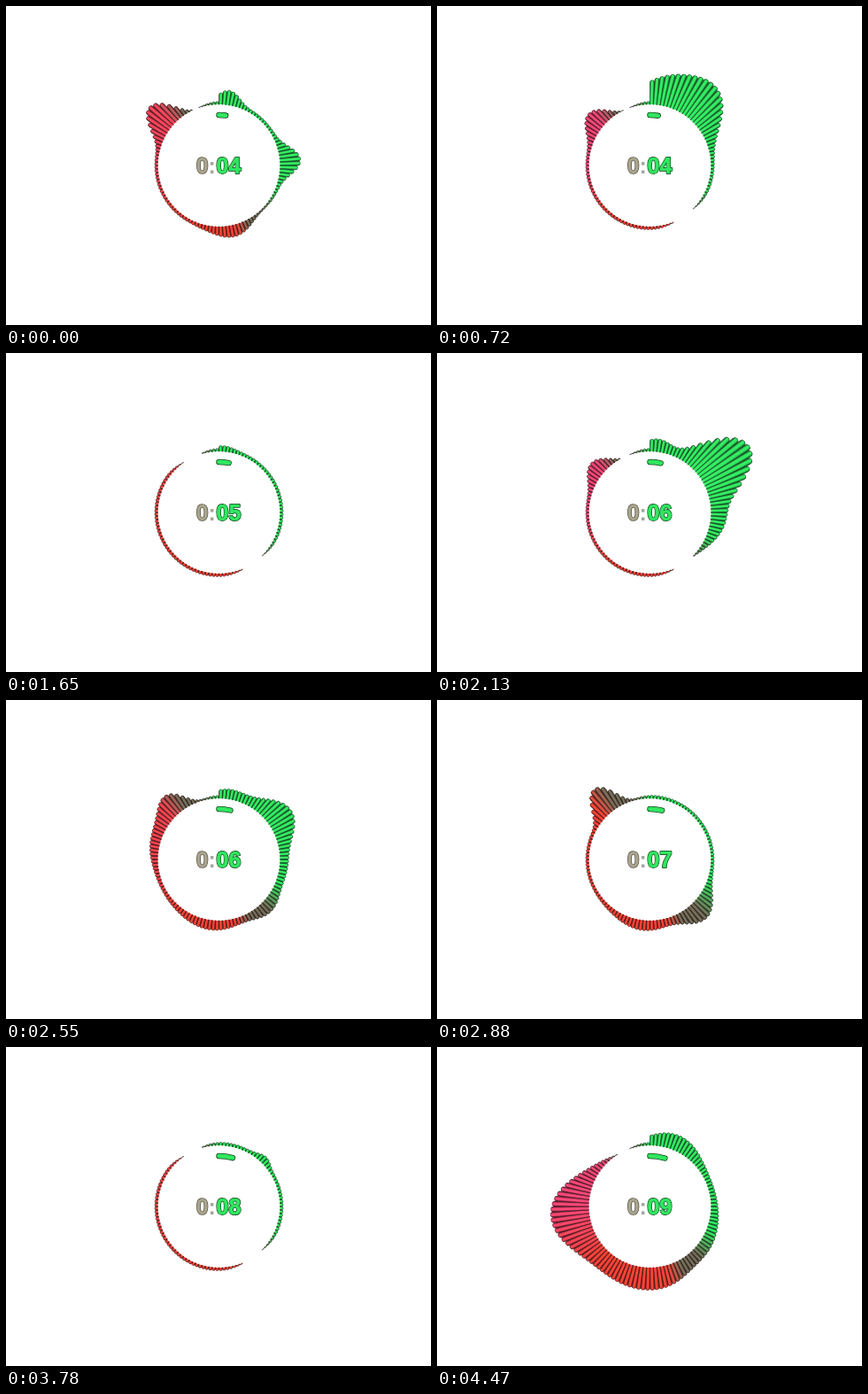
Recreate the animation shown at these times as an HTML page with a canvas. Size 480 by 360 pixels, loop 4500 ms.

```html
<!DOCTYPE html>
<html>
<head>
<meta charset="utf-8">
<style>
  html, body { margin: 0; width: 100%; height: 100%; overflow: hidden; background: #fff; }
  canvas { display: block; width: 480px; height: 360px; }
</style>
</head>
<body>
<canvas id="stage" width="480" height="360"></canvas>
<script>
const ctx = document.getElementById('stage').getContext('2d');
const LOOP = 4500, STEP = 30, BARS = 112;
const CX = 240.5, CY = 180, R = 69;
const RAD = Math.PI / 180, HALF = Math.PI / BARS;

const GREEN = [50, 230, 96], BROWN = [118, 108, 88], RED = [255, 66, 54], PINK = [242, 70, 116];

// Key shapes; each bump is [angle, height, width].
const poses = [
  { at: 0, pink: .6, bumps: [[8, 13, 8], [86, 20, 9], [165, 11, 16], [310, 31, 10]] },
  { at: 720, pink: 1, bumps: [[18, 31, 22], [44, 26, 14], [310, 19, 10]] },
  { at: 1650, pink: .2, bumps: [[4, 3, 8]] },
  { at: 2130, pink: 1, bumps: [[6, 11, 11], [56, 62, 14], [96, 13, 16], [310, 15, 10]] },
  { at: 2880, pink: 0, bumps: [[137, 23, 13], [185, 8, 20], [322, 32, 9]] },
  { at: 3780, pink: .2, bumps: [[44, 5, 6]] },
  { at: 4470, pink: 1, bumps: [[22, 14, 20], [180, 22, 50], [266, 35, 21]] }
];
const swell = [[22, 32, 18], [190, 22, 28], [290, 58, 18]];

const lerp = (a, b, k) => a + (b - a) * k;
const mix = (a, b, k) => a.map((v, i) => lerp(v, b[i], k));
const rgb = (c, k = 1) => `rgb(${c.map(v => Math.min(255, Math.round(v * k))).join(',')})`;
const bell = (a, mid, width) => Math.exp(-(((a - mid) / width) ** 2) / 2);
const sum = (bumps, a) => bumps.reduce((h, [mid, top, w]) => h + top * bell(a, mid, w), 0);

function colourAt(a, pink) {
  const warm = mix(RED, PINK, pink);
  const stops = [
    [0, GREEN], [112, GREEN], [136, BROWN], [152, BROWN], [166, RED], [225, RED],
    [268, warm], [313, warm], [327, BROWN], [345, BROWN], [360, GREEN]
  ];
  const i = stops.findIndex(s => s[0] > a);
  const [a0, c0] = stops[i - 1], [a1, c1] = stops[i];
  return mix(c0, c1, (a - a0) / (a1 - a0));
}

function stateAt(t) {
  const n = Math.max(1, poses.findIndex(p => p.at >= t) % poses.length);
  const from = poses[n - 1], to = poses[n], span = to.at - from.at;
  const raw = (t - from.at) / span;
  const k = raw * raw * (3 - 2 * raw);
  const beat = Math.sin(Math.PI * raw * Math.round(span / 450)) ** 2;
  return {
    pink: lerp(from.pink, to.pink, k),
    // The ring thins out where the two colour bands meet.
    height: a => 3.6 - 4.6 * (bell(a, 145, 13) + bell(a, 333, 11))
      + lerp(sum(from.bumps, a), sum(to.bumps, a), k) + beat * sum(swell, a)
  };
}

function drawBar(a, h, colour) {
  const outer = R + h, w = outer * HALF;
  const neck = outer - Math.min(h, w * 1.2);
  const shade = ctx.createLinearGradient(-w, 0, w, 0);
  shade.addColorStop(0, rgb(colour, .25));
  shade.addColorStop(.35, rgb(colour, 1.05));
  shade.addColorStop(.65, rgb(colour));
  shade.addColorStop(1, rgb(colour, .3));
  ctx.save();
  ctx.translate(CX, CY);
  ctx.rotate(a * RAD);
  ctx.beginPath();
  ctx.moveTo(-R * HALF, -R);
  ctx.lineTo(-neck * HALF, -neck);
  ctx.quadraticCurveTo(-w, -outer, 0, -outer);
  ctx.quadraticCurveTo(w, -outer, neck * HALF, -neck);
  ctx.lineTo(R * HALF, -R);
  ctx.fillStyle = shade;
  ctx.fill();
  ctx.strokeStyle = rgb(colour, .3);
  ctx.lineWidth = .6;
  ctx.stroke();
  ctx.restore();
}

function drawProgress(seconds) {
  ctx.lineCap = 'round';
  for (const [width, style] of [[6.4, rgb(GREEN, .3)], [4.8, rgb(GREEN)]]) {
    ctx.beginPath();
    ctx.arc(CX, CY, 57, -Math.PI / 2, (seconds * 1.9 - 90) * RAD);
    ctx.lineWidth = width;
    ctx.strokeStyle = style;
    ctx.stroke();
  }
}

function label(text, x, fill, edge, weight) {
  ctx.strokeStyle = edge;
  ctx.lineWidth = weight + 1.4;
  ctx.strokeText(text, x, 189);
  ctx.strokeStyle = ctx.fillStyle = fill;
  ctx.lineWidth = weight;
  ctx.strokeText(text, x, 189);
  ctx.fillText(text, x, 189);
}

function drawClock(seconds) {
  ctx.font = 'bold 25px "Liberation Sans", Arial, sans-serif';
  ctx.lineJoin = 'round';
  label('0', 214.8, '#aaa68e', rgb(BROWN, .7), .1);
  ctx.fillStyle = '#a3a89c';
  ctx.fillText(':', 228.6, 189);
  label(String(Math.floor(seconds)).padStart(2, '0'), 237.6, rgb(GREEN), rgb(GREEN, .3), .7);
}

function draw(time) {
  const t = Math.floor((time % LOOP) / STEP) * STEP;
  const { pink, height } = stateAt(t);
  ctx.fillStyle = '#fff';
  ctx.fillRect(0, 0, 480, 360);
  for (let i = 0; i < BARS; i++) {
    const a = (i + .5) * 360 / BARS, h = height(a);
    if (h > .4) drawBar(a, h, colourAt(a, pink));
  }
  const seconds = 4.1 + t / 900;
  drawProgress(seconds);
  drawClock(seconds);
}

const start = performance.now();
function tick() {
  draw(performance.now() - start);
  requestAnimationFrame(tick);
}
tick();
</script>
</body>
</html>
```
